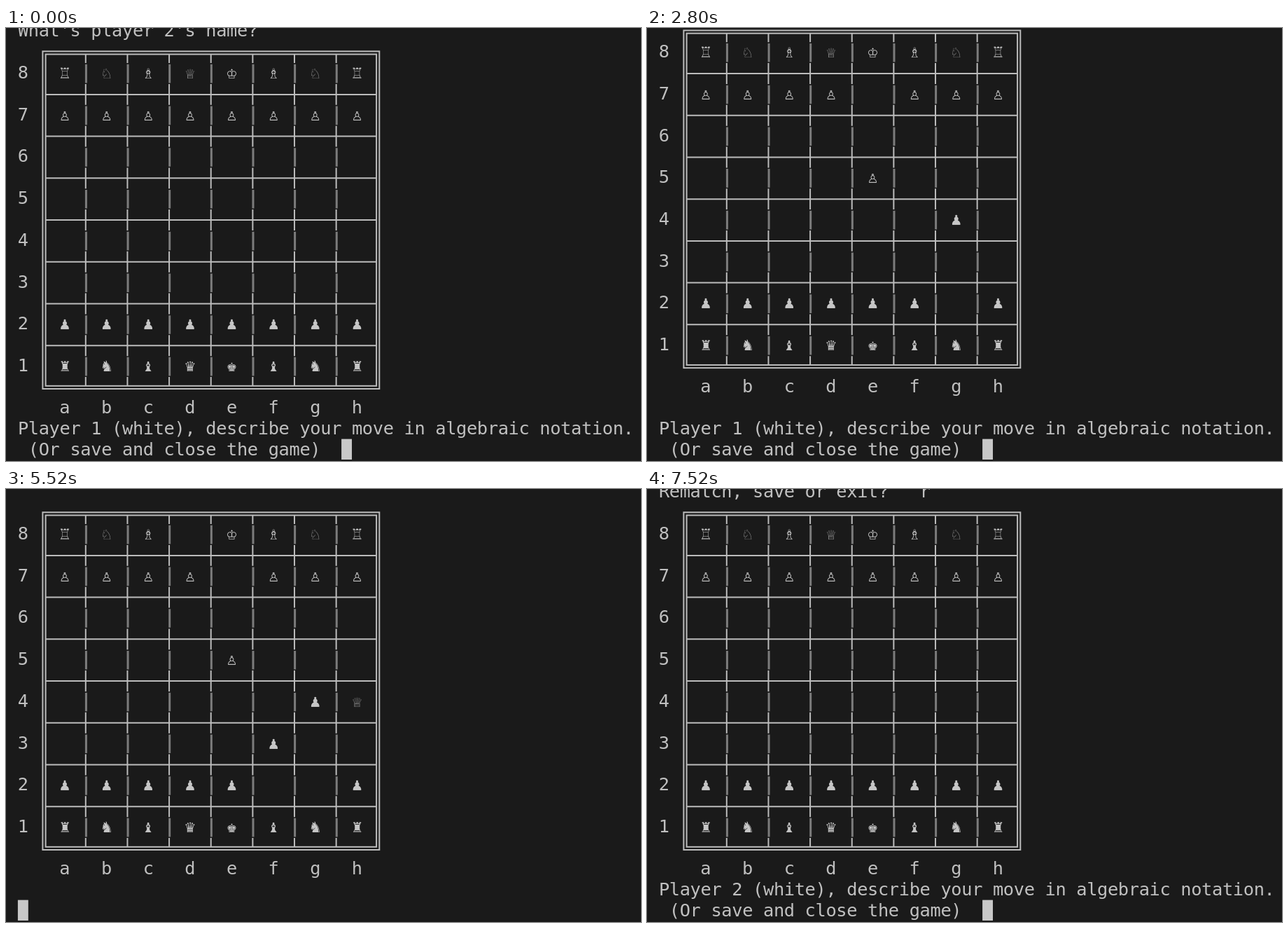
Animation, 907 px wide and 618 px high, one loop 8 s. Source, as an HTML page:

```html
<!DOCTYPE html>
<html lang="en">
<head>
<meta charset="utf-8">
<title>Terminal chess</title>
<style>
  html, body { margin: 0; width: 100%; height: 100%; overflow: hidden; background: #1a1a1a; }
  svg { display: block; }
  text { font: 25.35px "DejaVu Sans Mono", monospace; letter-spacing: -0.35px; fill: #c0c0c0; white-space: pre; }
  .piece, .label { text-anchor: middle; letter-spacing: 0; }
  .piece { font-size: 24px; fill: #c6c6c6; }
  .frame, .grid { fill: none; stroke: #bcbcbc; stroke-width: 2; }
  .bars { fill: none; stroke: #7c7c7c; stroke-width: 3; }
</style>
</head>
<body>
<svg id="stage" width="907" height="618" viewBox="0 0 907 618"></svg>
<script>
const LOOP = 8000;
const COL = 14.91, ROW = 29.86, LEFT = 16.9, BASE = 609.5;
const stage = document.getElementById("stage");

const colMid = col => LEFT + (col + 0.5) * COL;
const baseline = row => BASE - row * ROW;      // rows count upwards from the bottom
const lineMid = row => 602.5 - row * ROW;

function add(parent, tag, attrs = {}, content = "") {
  const node = document.createElementNS("http://www.w3.org/2000/svg", tag);
  for (const key in attrs) node.setAttribute(key, attrs[key]);
  node.textContent = content;
  return parent.appendChild(node);
}

// Board, laid out with its file letters on row 2
const board = add(stage, "g");
const squares = {};

function drawFrame(inset) {
  const x = 52.4 + inset, y = 33.3 + inset;
  add(board, "rect", { class: "frame", x, y, width: 480.9 - 2 * inset, height: 481.7 - 2 * inset });
}

function drawBoard() {
  drawFrame(0);
  drawFrame(4.2);
  let grid = "", bars = "";
  for (let i = 1; i < 8; i++) {
    const x = colMid(2 + 4 * i);
    grid += `M56.6 ${lineMid(3 + 2 * i)}H529.1`;
    grid += `M${x} 37.5V${lineMid(19) + ROW / 2}M${x} ${lineMid(3) - ROW / 2}V510.8`;
    for (let j = 1; j < 8; j++) grid += `M${x} ${lineMid(3 + 2 * j) - ROW / 2}v${ROW}`;
    for (let j = 0; j < 8; j++) bars += `M${x + 0.6} ${baseline(4 + 2 * j) - 20.2}v26.6`;
  }
  add(board, "path", { class: "bars", d: bars });
  add(board, "path", { class: "grid", d: grid });

  [..."abcdefgh"].forEach((file, i) => {
    const x = colMid(4 + 4 * i);
    add(board, "text", { class: "label", x, y: baseline(2) }, file);
    for (let rank = 1; rank <= 8; rank++)
      squares[file + rank] = add(board, "text", { class: "piece", x, y: baseline(2 + 2 * rank) });
  });
  for (let rank = 1; rank <= 8; rank++)
    add(board, "text", { class: "label", x: colMid(0), y: baseline(2 + 2 * rank) }, rank);
}

drawBoard();
const rows = [0, 1, 2, 3, 20].map(row => add(stage, "text", { x: LEFT, y: baseline(row) }));
const cursor = add(stage, "rect", { y: 586.6, width: COL, height: 29.4, fill: "#c8c8c8" });

const MOVES = ["g2g4", "e7e5", "f2f3", "d8h4"];

function position(count) {
  const pieces = {};
  [..."abcdefgh"].forEach((file, i) => {
    pieces[file + 1] = "♜♞♝♛♚♝♞♜"[i];
    pieces[file + 2] = "♟";
    pieces[file + 7] = "♙";
    pieces[file + 8] = "♖♘♗♕♔♗♘♖"[i];
  });
  for (const move of MOVES.slice(0, count)) {
    const from = move.slice(0, 2);
    pieces[move.slice(2)] = pieces[from];
    delete pieces[from];
  }
  return pieces;
}

// Screen builders: text lines run from the bottom row upwards, then the top row
const prompt = (player, side, typed) => [
  " (Or save and close the game)  " + typed,
  `Player ${player} (${side}), describe your move in algebraic notation.`
];
const turn = (time, moves, typed) => ({
  time, moves, labels: 3,
  lines: moves % 2 ? prompt(2, "black", typed) : prompt(1, "white", typed)
});
const fresh = (time, player, top, typed) => ({
  time, moves: 0, labels: 2, lines: [...prompt(player, "white", typed), "", "", top]
});
const redraw = (time, moves) => ({ time, moves, labels: 2, lines: [""] });
const result = (time, typed) => ({
  time, moves: 4, labels: 5,
  lines: ["Rematch, save or exit?   " + typed, "Draws – 0; Player 1 – 1; Player 2 – 0.", "Player 1 wins!", "Checkmate"]
});

const opening = "What's player 2's name?";
const screens = [
  fresh(0, 1, opening, ""), fresh(160, 1, opening, "g"), fresh(400, 1, opening, "g4"),
  redraw(640, 1), turn(720, 1, ""), turn(1520, 1, "e"), turn(1840, 1, "e5"),
  redraw(2000, 2), turn(2080, 2, ""), turn(2960, 2, "f"), turn(3280, 2, "f3"),
  turn(3600, 3, ""), turn(4400, 3, "Q"), turn(4640, 3, "Qh"), turn(5200, 3, "Qh4"),
  redraw(5520, 4), result(5600, ""), result(7200, "r"),
  fresh(7520, 2, "Rematch, save or exit?   r", "")
];

let shown;
function render(time) {
  const screen = screens.findLast(s => s.time <= time);
  if (screen === shown) return;
  shown = screen;
  const pieces = position(screen.moves);
  for (const name in squares) {
    const piece = pieces[name] || "";
    squares[name].textContent = piece;
    squares[name].setAttribute("opacity", "♘♕".includes(piece) ? 0.7 : 1);
  }
  board.setAttribute("transform", `translate(0 ${(2 - screen.labels) * ROW})`);
  rows.forEach((row, i) => row.textContent = screen.lines[i] || "");
  cursor.setAttribute("x", LEFT + screen.lines[0].length * COL);
}

const start = performance.now();
function tick() {
  render((performance.now() - start) % LOOP);
  requestAnimationFrame(tick);
}
tick();
</script>
</body>
</html>
```
